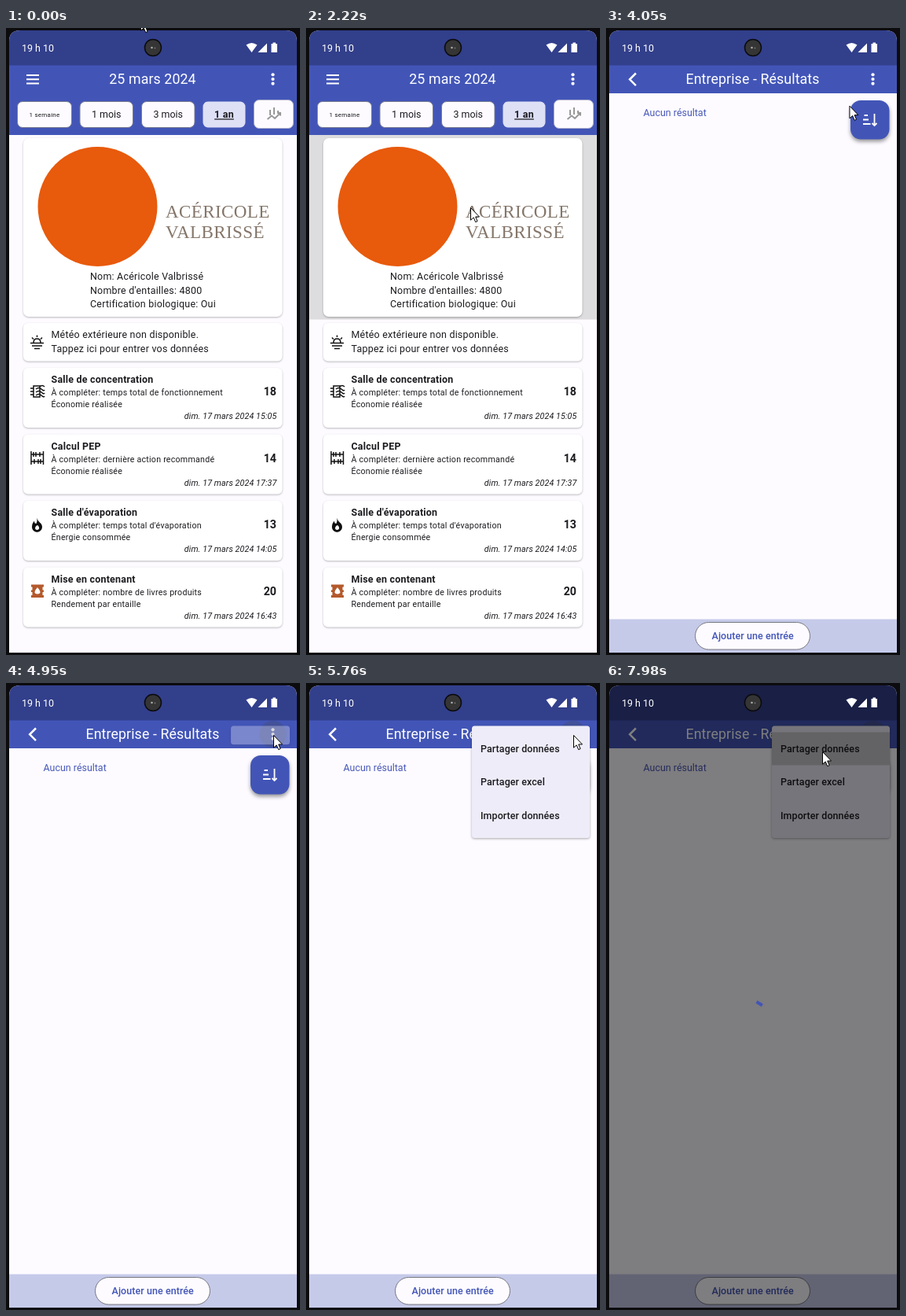
Write an HTML page that moves like this. It is 374x797 px and loops after 8000 ms.

```html
<!DOCTYPE html>
<html lang="fr">
<head>
<meta charset="utf-8">
<style>
html, body { margin: 0; width: 100%; height: 100%; overflow: hidden; background: #0c0c0e }
svg { display: block; width: 100vw; height: 100vh }
text { font: 12.46px Roboto, sans-serif; letter-spacing: .22px; fill: #1c1b1f; white-space: pre }
.title { font-size: 17.8px; letter-spacing: .1px; fill: #fff }
.plain { letter-spacing: 0 }
.mid { font-weight: 500; letter-spacing: .09px }
.head { font-weight: 700 }
.sub { font-size: 10.68px }
.date { font-size: 10.68px; font-style: italic; letter-spacing: .12px }
.num { font-size: 14.24px; font-weight: 700; letter-spacing: 0 }
.tiny { font-size: 8px }
.mark { font: 23px "Liberation Serif", serif; letter-spacing: .4px; fill: #85766a }
.card { fill: #fff; filter: drop-shadow(0 1px .8px #0004) }
.raised { filter: drop-shadow(0 3px 2.5px #0006) }
.line { fill: none; stroke: #111; stroke-width: 1.5 }
.white { fill: none; stroke: #fff; stroke-width: 2 }
</style>
</head>
<body>
<svg viewBox="0 0 374 797" preserveAspectRatio="none">
  <defs><clipPath id="screen"><path d="M4 794V17Q4 3 18 3H356Q370 3 370 17V794Z"/></clipPath></defs>
  <g clip-path="url(#screen)">
    <rect x="4" y="3" width="366" height="792" fill="#fdfbff"/>
    <rect x="4" y="3" width="366" height="45" fill="#323f8b"/>
    <g id="home"></g>
    <g id="results"></g>
    <rect id="dim" x="4" y="3" width="366" height="792"/>
    <path id="spinner" d="M191.500 405.200L198.800 409.700" stroke="#4255b7" stroke-width="4"/>
  </g>
  <g id="status" fill="#fff">
    <text x="20" y="30" class="plain" style="fill:#fff">19 h 10</text>
    <path d="M305.500 21.500Q312.500 16.500 319.500 21.500L312.500 31ZM320.500 31H332V19.500ZM337.500 20H339.500V18.500H343V20H345V31H337.500Z"/>
    <circle cx="187" cy="25" r="10.500" fill="#353536" stroke="#0b0b0d" stroke-width="1.500"/>
    <circle cx="185.500" cy="25" r="1.300" fill="#aaa"/>
    <circle cx="189.500" cy="25.500" r=".9" fill="#777"/>
  </g>
  <path id="cursor" d="M.5 .5V16.200L4.200 12.900L6.700 18.700L9.100 17.600L6.700 12H11.500Z" fill="#fff" stroke="#000"/>
</svg>
<script>
const $ = id => document.getElementById(id);
const text = (x, y, s, cls = '', attrs = '') => `<text x="${x}" y="${y}" class="${cls}" ${attrs}>${s}</text>`;
const box = (x, y, w, h, r, attrs) => `<rect x="${x}" y="${y}" width="${w}" height="${h}" rx="${r}" ${attrs}/>`;
const path = (d, attrs = 'class="line"') => `<path d="${d}" ${attrs}/>`;
const middle = 'text-anchor="middle"', end = 'text-anchor="end"';
const dots = [59.3, 65, 70.7].map(y => `<circle cx="339.5" cy="${y}" r="2.1" fill="#fff"/>`).join('');
const bar = h => box(4, 47.5, 366, h, 0, 'fill="#4255b7"');

const chip = (x, w, label, cls) =>
  box(x + .5, 93.5, w, 33, 6.5, cls === 'head' ? 'fill="#dee0f6"' : 'fill="#fdfbff" stroke="#777a90"') +
  text(x + w / 2 + .5, cls === 'tiny' ? 113 : 114.3, label, cls, middle + (cls === 'head' ? ' text-decoration="underline"' : ''));

const icons = [
  path('M35 455H43V469H35ZM31 458H35M31 462H35M31 466H35M43 456Q46 453 49 456M38 459Q42 456 45 459T49 460M38 463Q42 460 45 463T49 464M38 467Q42 464 45 467T49 468'),
  path('M32 538V555M47.500 538V555M32 542H47M32 551H47M35 539V545M38 539V545M43 539V545M36 548V554M41 548V554M44 548V554'),
  path('M39.500 622.500C40 628 46 629 46 634C46 643 33 643 33 634C33 630 35 628 36 626.500Q36 630 38.500 630Q40 627 39.500 622.500M40 632C36 634 36.500 638 39.500 638C43 638 43 634 40 632', 'fill="#111" fill-rule="evenodd"'),
  path('M32 707.500H48V710.500H46.500V714.500H48V717H46.500V721H48V724H32V721H33.500V717H32V714.500H33.500V710.500H32Z', 'fill="#b4592c"') +
  path('M40 711Q47 719 40 719.500Q33 719 40 711', 'fill="#fff"')
];

const card = ([title, todo, note, count, date], i) => {
  const y = 432 + i * 84.5;
  return box(22, y, 329.5, 76, 6, 'class="card"') + icons[i] +
    text(57.5, y + 19.3, title, 'head') + text(57.5, y + 35, 'À compléter: ' + todo, 'sub') +
    text(57.5, y + 50.3, note, 'sub') + text(344, y + 35, count, 'num', end) +
    text(344.5, y + 65, `dim. 17 mars 2024 ${date}`, 'date', end);
};

$('home').innerHTML = bar(88.5) + path('M26 60H42M26 65.300H42M26 70.600H42', 'class="white"') +
  text(186.5, 71.3, '25 mars 2024', 'title', middle) + dots +
  chip(14, 69, '1 semaine', 'tiny') + chip(93.5, 67.5, '1 mois', 'plain') +
  chip(172, 67.5, '3 mois', 'plain') + chip(250, 54, '1 an', 'head') +
  box(315.5, 91.5, 50, 36, 6.5, 'fill="#fdfbff" stroke="#aeb1cd"') +
  path('M336 104V111M341 101V110M346 105V109M332.500 116L338 111.500L342 115L349 108M345.500 108H349V111.500', 'fill="none" stroke="#999" stroke-width="2"') +
  box(4, 136, 366, 234.5, 0, 'id="hover"') + box(4, 136, 366, 234.5, 0, 'id="press" fill="#bcbcbc"') +
  box(22, 140, 329.5, 227, 7, 'class="card"') +
  '<circle cx="116.500" cy="227" r="76" fill="#e85a0c"/>' +
  text(203, 241, 'ACÉRICOLE', 'mark') + text(203, 267, 'VALBRISSÉ', 'mark') +
  text(107, 319.8, 'Nom: Acéricole Valbrissé') + text(107, 337.6, "Nombre d'entailles: 4800") +
  text(107, 355.4, 'Certification biologique: Oui') +
  box(22, 375, 329.5, 48.5, 6, 'class="card"') +
  path('M31 400.500H48M33 404H46M36 407.500H43M35 400Q35 395 39.500 395T44 400M39.500 390.500V393M33 393.500L35 395.500M46 393.500L44 395.500') +
  text(57.5, 394.4, 'Météo extérieure non disponible.') + text(57.5, 412.2, 'Tappez ici pour entrer vos données') +
  [
    ['Salle de concentration', 'temps total de fonctionnement', 'Économie réalisée', 18, '15:05'],
    ['Calcul PEP', 'dernière action recommandé', 'Économie réalisée', 14, '17:37'],
    ["Salle d'évaporation", "temps total d'évaporation", 'Énergie consommée', 13, '14:05'],
    ['Mise en contenant', 'nombre de livres produits', 'Rendement par entaille', 20, '16:43']
  ].map(card).join('');

const choices = ['Partager données', 'Partager excel', 'Importer données'];
$('results').innerHTML = bar(35.5) + path('M38 57.500L30.200 65.300L38 73.100', 'class="white" style="stroke-width:2.500"') +
  text(186.5, 71.3, 'Entreprise - Résultats', 'title', middle) + dots +
  '<circle id="ripple" cx="339.500" cy="65" r="17" fill="#444" opacity=".25"/>' +
  text(47.5, 112.3, 'Aucun résultat', 'plain', 'style="fill:#4a5ab8"') +
  box(311, 92, 49.5, 49.5, 13, 'fill="#4255b7" class="raised"') +
  path('M328.500 111H333M327 116.500H334M327 122H336.500M341.500 109V124M338.500 121L341.500 124L344.500 121', 'class="white" style="stroke-width:1.800"') +
  box(4, 751.5, 366, 43, 0, 'fill="#c5cae9"') +
  box(113.5, 755.5, 146, 34.5, 17.2, 'fill="#fdfbff" stroke="#777680"') +
  text(186.7, 777.3, 'Ajouter une entrée', 'mid', middle + ' style="fill:#4255b7"') +
  '<g id="menu">' + box(211, 54.5, 150, 142.5, 3.5, 'id="sheet" fill="#eeecf8" style="filter:drop-shadow(0 1.500px 1.500px #0005)"') +
  box(211, 62.5, 150, 42, 0, 'id="pick" fill="#8c8c84"') +
  choices.map((s, i) => text(222, 87.5 + i * 42.7, s, 'mid', `id="choice${i}"`)).join('') + '</g>';

// Pointer path: time, x, y
const route = [
  [0, 171, -13], [320, 171, -13], [910, 87, 218], [1249, 87, 218], [1250, 107, 238],
  [1450, 107, 238], [2020, 209, 228], [2770, 209, 228], [3310, 246, 174], [3490, 268, 143],
  [3590, 268, 143], [4380, 339, 67], [4479, 339, 67], [4480, 340, 66], [6640, 340, 66],
  [7170, 275, 87], [8000, 275, 87]
];
const ramp = (t, a, b) => Math.min(1, Math.max(0, (t - a) / (b - a)));
const show = (id, opacity) => $(id).setAttribute('opacity', opacity);

function pointer(t) {
  const i = route.findIndex(k => k[0] > t);
  const [a, x, y] = route[i - 1], [b, x2, y2] = route[i], p = ramp(t, a, b);
  return [x + (x2 - x) * p, y + (y2 - y) * p];
}

function draw(t) {
  const [x, y] = pointer(t), home = t < 2240;
  $('cursor').setAttribute('transform', `translate(${x} ${y})`);
  $('home').style.display = home ? '' : 'none';
  $('results').style.display = home ? 'none' : '';
  show('hover', y > 136 ? .04 : 0);
  show('press', .4 * ramp(t, 2020, 2200));

  // Menu grows from its top right corner, then its entries fade in one by one
  const p = ramp(t, 4850, 5760), unit = 1 / 4.5;
  const w = 150 * ramp(p, 0, unit);
  $('sheet').setAttribute('x', 361 - w);
  $('sheet').setAttribute('width', w);
  $('sheet').setAttribute('height', 142.5 * ramp(p, 0, 3 * unit));
  show('menu', ramp(p, 0, 1 / 3));
  choices.forEach((_, i) => show('choice' + i, ramp(p, (i + 1) * unit, Math.min(1, (i + 2.5) * unit))));
  show('ripple', .25 * ramp(t, 4850, 4930));

  show('pick', .4 * ramp(t, 7640, 7750));
  const d = ramp(t, 7740, 7980);
  show('dim', .5 * d * (2 - d));
  show('spinner', ramp(t, 7860, 7960));
}

function tick() {
  draw(performance.now() % 8000);
  requestAnimationFrame(tick);
}
tick();
</script>
</body>
</html>
```
